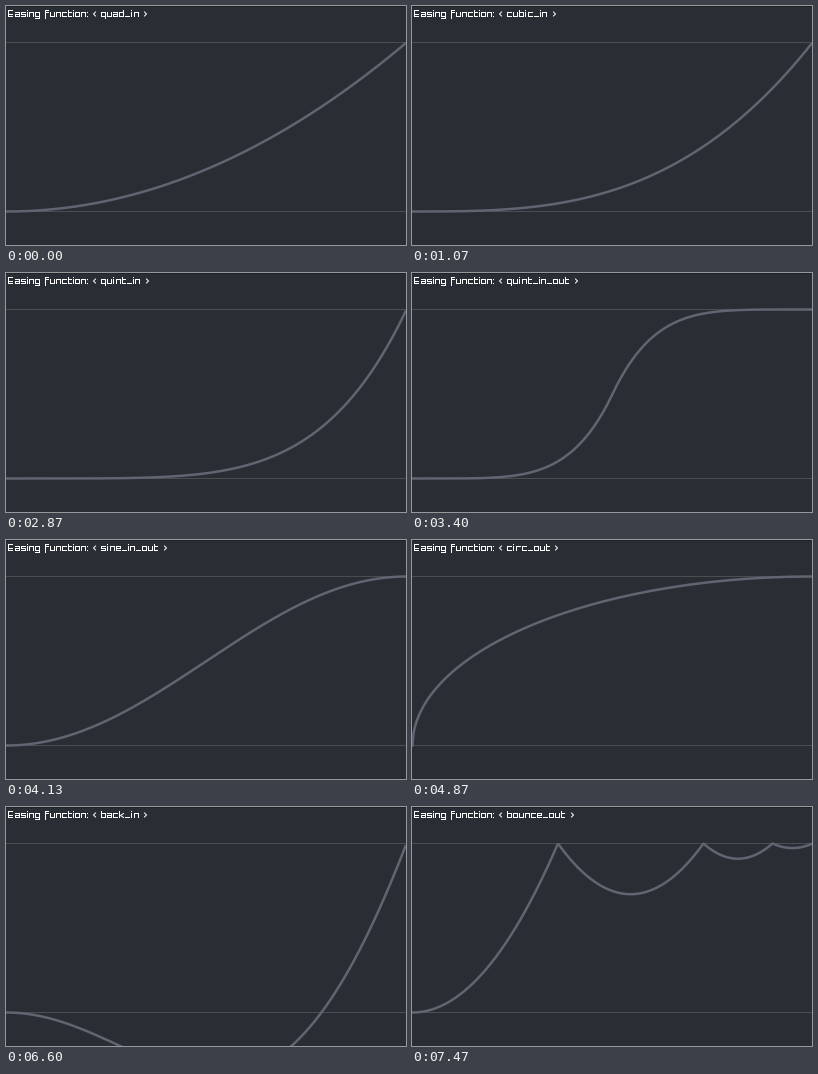
A matplotlib script for the animation above (7.67 s loop, 400 px wide and 239 px high).

```python
import numpy as np
import matplotlib.pyplot as plt
from matplotlib.animation import FuncAnimation
from matplotlib.collections import LineCollection

W, H, DPI = 400, 239, 100
PX = 72 / DPI                      # one pixel in points
LOOP, STEP = 7670, 26
LOW, HIGH = 205.5, 36.5            # pixel rows of value 0 and value 1
BG, EDGE, GUIDE, CURVE = "#292d34", "#1f2227", "#4a4d51", "#626571"

# Ticks (1/15 s) that each easing stays on screen
HOLD = [5, 6, 5, 5, 5, 4, 5, 4, 4, 4, 4, 4, 4, 3, 4,
        4, 4, 3, 4, 3, 4, 3, 4, 4, 3, 3, 4, 3, 3]
ENDS = np.round(np.cumsum(HOLD) / 15 * 100) * 10


def power(n):
    return lambda t: t ** n


def bounce(t):
    """Parabolic arches, each 0.3 times as deep as the one before."""
    t = 1 - t
    knots = np.array([-4 / 11, 4 / 11, 8 / 11, 0.9, 1.0])
    k = np.clip(np.searchsorted(knots, t, side="right") - 1, 0, 3)
    mid, half = (knots[k] + knots[k + 1]) / 2, (knots[k + 1] - knots[k]) / 2
    return 0.3 ** k * (1 - ((t - mid) / half) ** 2)


EASE_IN = {
    "quad": power(2),
    "cubic": power(3),
    "quart": power(4),
    "quint": power(5),
    "sine": lambda t: 1 - np.cos(t * np.pi / 2),
    "circ": lambda t: 1 - np.sqrt(1 - t * t),
    "exp": lambda t: np.where(t == 0, 0, 2 ** (10 * (t - 1))),
    "elastic": lambda t: np.sin(6.5 * np.pi * t) * 2 ** (10 * (t - 1)),
    "back": lambda t: t ** 3 - t * np.sin(np.pi * t),
    "bounce": bounce,
}


def ease_out(f):
    return lambda t: 1 - f(1 - t)


def ease_in_out(f):
    def both(t):
        first = f(np.minimum(2 * t, 1)) / 2
        second = 1 - f(np.minimum(2 - 2 * t, 1)) / 2
        return np.where(t < 0.5, first, second)
    return both


# Stroke font: rows of the cap line, x-height, middle, baseline, descender
CAP, XH, MID, BASE, DESC = 4.5, 6.5, 8.5, 10.5, 12.5
DOT = 0.1
STROKES = {
    "C": [(0, CAP), (4, CAP)],          # bars
    "t": [(0, XH), (4, XH)],
    "m": [(0, MID), (4, MID)],
    "b": [(0, BASE), (4, BASE)],
    "y": [(0, DESC), (4, DESC)],
    "h": [(0, XH), (3, XH)],
    "j": [(0, BASE), (3, BASE)],
    "H": [(0, CAP), (3, CAP)],
    "l": [(0, XH), (0, BASE)],          # stems
    "r": [(4, XH), (4, BASE)],
    "u": [(0, XH), (0, MID)],
    "w": [(0, MID), (0, BASE)],
    "p": [(4, XH), (4, MID)],
    "v": [(4, MID), (4, BASE)],
    "A": [(0, CAP), (0, XH)],
    "B": [(4, CAP), (4, XH)],
    "d": [(0, BASE), (0, DESC)],
    "D": [(4, BASE), (4, DESC)],
    "i": [(0, CAP), (0, CAP + DOT)],    # dots
    "1": [(0, XH), (0, XH + DOT)],
    "2": [(0, BASE), (0, BASE + DOT)],
    "/": [(4, XH), (1, MID), (4, BASE)],    # diagonals
    "x": [(0, XH), (4, BASE)],
    "z": [(4, XH), (0, BASE)],
    "<": [(2, XH - .5), (0, MID - .5), (2, BASE - .5)],
    ">": [(1, XH - .5), (3, MID - .5), (1, BASE - .5)],
}
GLYPHS = {
    "E": "CAlmb", "a": "trmbw", "s": "tumvb", "i": "il", "n": "ltr",
    "g": "tlbrDy", "f": "HAhld", "u": "lbr", "c": "tlb", "t": "Alhj",
    "o": "tlbr", "e": "tlmpb", "q": "tlbrD", "d": "tlbrB", "b": "tlbrA",
    "p": "tlbrd", "r": "lt", "k": "Al/", "x": "xz", "l": "Al",
    ":": "12", "_": "b", "<": "<", ">": ">", " ": "",
}
ADVANCE = {"E": 7, "i": 2.5, "l": 2.5, ":": 2.5, "t": 5, "f": 5,
           " ": 3.5, "<": 4.5, ">": 4.5}


def write(text, pen=2.0):
    lines = []
    for ch in text:
        left = np.floor(pen) + 0.5
        for key in GLYPHS[ch]:
            lines.append([(left + x, y) for x, y in STROKES[key]])
        pen += ADVANCE.get(ch, 6)
    return lines


xs = np.arange(W)
slides = []
for name, f in EASE_IN.items():
    for suffix, g in (("in", f), ("out", ease_out(f)),
                      ("in_out", ease_in_out(f))):
        ys = LOW + (HIGH - LOW) * g(xs / W)
        slides.append((write(f"Easing function: < {name}_{suffix} >"), ys))

fig = plt.figure(figsize=(W / DPI, H / DPI), dpi=DPI, facecolor=BG)
ax = fig.add_axes([0, 0, 1, 1])
ax.set_xlim(0, W)
ax.set_ylim(H, 0)
ax.axis("off")


def rule(row, color, z):
    ax.plot([0, W], [row, row], color=color, lw=PX, zorder=z, snap=False)


rule(LOW, GUIDE, 1)
rule(HIGH, GUIDE, 1)
rule(0.5, EDGE, 4)
curve, = ax.plot([], [], color=CURVE, lw=2.5 * PX, zorder=2, snap=False,
                 solid_capstyle="projecting", solid_joinstyle="round")
label = LineCollection([], colors="white", linewidths=PX, zorder=3,
                       capstyle="projecting", snap=False)
ax.add_collection(label, autolim=False)


def draw(i):
    k = np.searchsorted(ENDS, i * STEP + STEP - 1, side="right")
    text, ys = slides[min(k, len(HOLD) - 1)]
    curve.set_data(xs + 0.5, ys)
    label.set_segments(text)
    return curve, label


anim = FuncAnimation(fig, draw, frames=LOOP // STEP, interval=STEP,
                     init_func=lambda: draw(0), repeat=True, repeat_delay=0)
plt.show()
```
